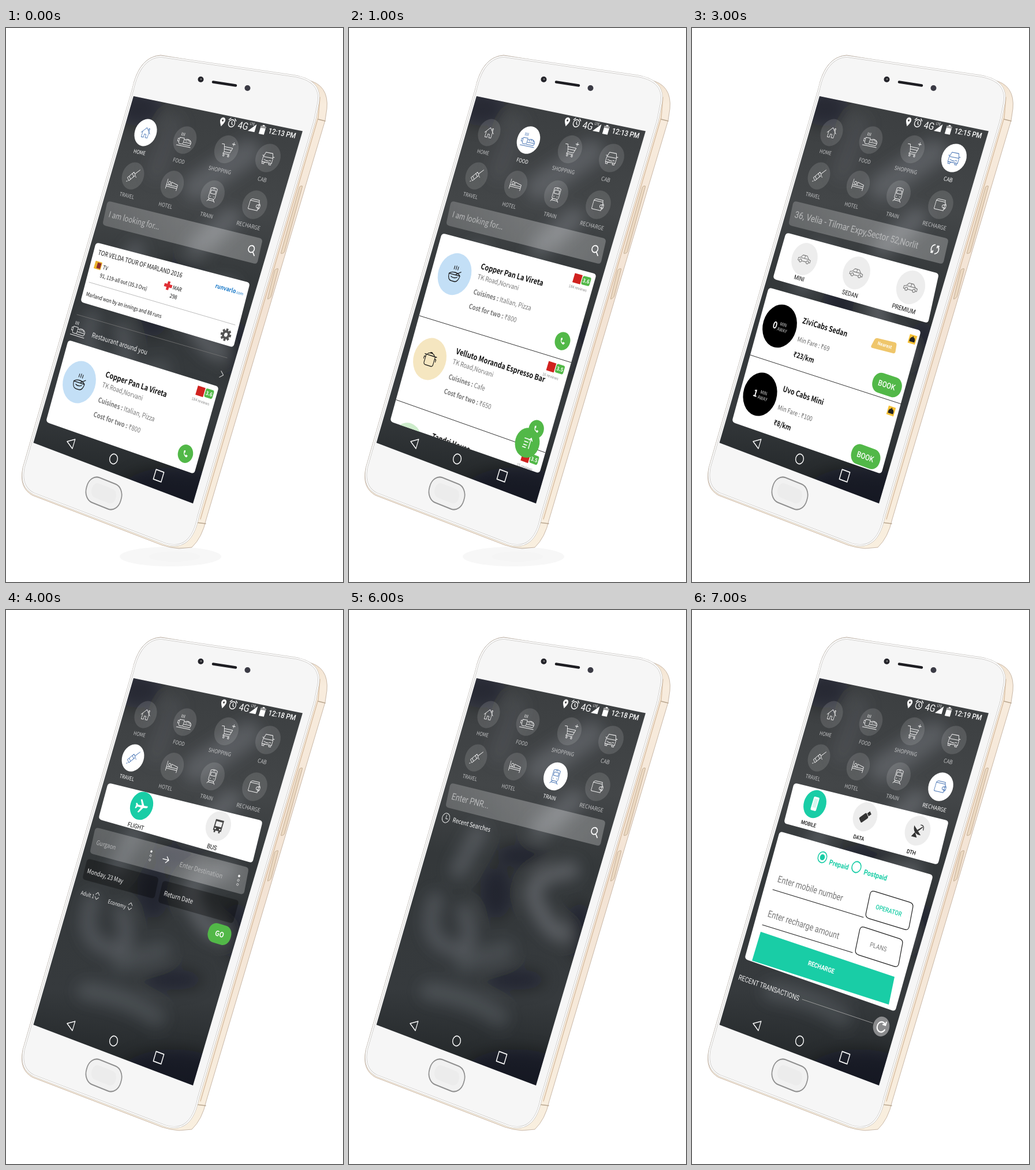
An HTML page for the animation above (8000 ms loop, 584 by 959 pixels).

```html
<!DOCTYPE html>
<html lang="en">
<head>
<meta charset="utf-8">
<title>Phone assistant tour</title>
<style>
html, body { margin: 0; width: 100%; height: 100%; overflow: hidden; background: #fff; }
svg { display: block; width: 584px; height: 959px; }
text { font-family: "Noto Sans CJK SC", "Noto Sans CJK JP", "Noto Sans CJK", "Noto Sans", sans-serif; white-space: pre; }
.r { font-family: Roboto, sans-serif; }
.m { text-anchor: middle; }
.b { font-weight: 700; }
.md { font-weight: 500; }
.line { fill: none; stroke-linecap: round; stroke-linejoin: round; }
.screen { visibility: hidden; animation: show 8s step-end infinite; }
@keyframes show {
  0% { visibility: visible; }
  12.5%, 100% { visibility: hidden; }
}
</style>
</head>
<body>
<svg id="stage" viewBox="0 0 584 959" xmlns="http://www.w3.org/2000/svg"></svg>
<script>
const GREEN = '#52b848', TEAL = '#19cda6', BLUE = '#4a76b5', DARK = '#151515', GREY = '#777';

// Linear part of the tilted screen plane near a stage point.
function plane(x, y) {
  const n = (x - 348 + .295 * (y - 203)) / 285;
  const m = y - 75 * n - 203;
  const slope = .207 + .000315 * m;
  const kx = (.85 + .13 * n) * (1 - .0001 * m), ky = 1.03 + .06 * n;
  return [kx, kx * slope, -.295 * ky, ky].map(k => k.toFixed(4)).join(' ');
}
const at = (x, y, inner) => `<g transform="matrix(${plane(x, y)} ${x} ${y})">${inner}</g>`;

function txt(x, y, s, size, fill, cls = '') {
  const half = / m\b|^m\b/.test(cls) ? 0 : s.replace(/<.*?>/g, '').length * size * .22;
  return `<text class="${cls}" transform="matrix(${plane(x + half, y + half * .27)} ${x} ${y})"
    y="${size * .36}" font-size="${size}" fill="${fill}">${s}</text>`;
}

const disc = (x, y, r, fill, inner = '') => at(x, y, `<circle r="${r}" fill="${fill}"/>${inner}`);
const stroke = (d, color = '#fff', w = 1.1) => `<path class="line" d="${d}" stroke="${color}" stroke-width="${w}"/>`;
const seg = (x1, y1, x2, y2, color, w = 1) => stroke(`M${x1},${y1}L${x2},${y2}`, color, w);
const pill = (x, y, w, h, r, fill) =>
  at(x, y, `<rect x="${-w / 2}" y="${-h / 2}" width="${w}" height="${h}" rx="${r}" fill="${fill}"/>`);

// Polygon with rounded corners, given as a flat list of corners.
function panel(c, r, fill, attrs = '') {
  const p = [], n = c.length / 2;
  for (let i = 0; i < n; i++) p.push([c[2 * i], c[2 * i + 1]]);
  const toward = (a, b) => {
    const k = r / Math.hypot(b[0] - a[0], b[1] - a[1]);
    return [a[0] + (b[0] - a[0]) * k, a[1] + (b[1] - a[1]) * k];
  };
  const d = p.map((a, i) =>
    `${i ? 'L' : 'M'}${toward(a, p[(i + n - 1) % n])}Q${a} ${toward(a, p[(i + 1) % n])}`).join('') + 'Z';
  return `<path d="${d}" fill="${fill}" ${attrs}/>`;
}

const MEAL = 'M-12,-3H-2V4Q-2,8 -5,8H-9Q-12,8 -12,4ZM-12,-1h-3v5h3M-10,-7v-5M-7,-7v-5M-4,-7v-5' +
  'M-2,8H13Q16,5 14,1Q10,-3 4,-2L-2,0M2,-1l2,3M6,-2l2,3M10,-1l2,3M-1,4H14M-15,11H16';
const CAR = 'M-13,4V0L-9,-1 -5,-6H4L9,-1 13,0V4H10M-13,4H-10M-5,4H5M-7,-1H8M0,-6V-1M-10,4a2.5,2.5 0 1,0 5,0a2.5,2.5 0 1,0 -5,0M5,4a2.5,2.5 0 1,0 5,0a2.5,2.5 0 1,0 -5,0';
const PHONE = '<path d="M-5,-5L-2,-6 -1,-2 -3,-1Q-2,2 1,3L2,1 6,2 5,5Q3,7 -1,4T-5,-5Z" fill="#fff" transform="scale(.85)"/>';
const BOWL = 'M-12,1H12Q11,12 3,12H-3Q-11,12 -12,1ZM-12,1Q-8,-3 0,-3T12,1M-6,5Q0,8 7,4M3,0L12,-6M-4,-8v-5M0,-8v-6M4,-8v-5';
const POT = 'M-10,-6H10V7Q10,11 6,11H-6Q-10,11 -10,7ZM-13,-6H13M-10,-2H-13V2M10,-2H13V2M-8,-6Q-7,-10 0,-10T8,-6M-2,-11H2';
const SEARCH = 'M-7,-2a5.5,5.5 0 1,0 11,0a5.5,5.5 0 1,0 -11,0M2.5,2L7,7';

const MENU = [
  ['HOME', 242, 181, 231.5, 215, 'M-10,1L0,-9 10,1M-7,-2V9H-2V3H2V9H7V-2M5,-4V-8H7V-2'],
  ['FOOD', 310, 194, 299.5, 230, MEAL],
  ['SHOPPING', 382, 210, 370.5, 246, 'M-12,-8H-7L-3,5H9L12,-4H-6M-5,0H10M-3,5L-5,8H9M-4,11a1.5,1.5 0 1,0 3,0a1.5,1.5 0 1,0 -3,0M6,11a1.5,1.5 0 1,0 3,0a1.5,1.5 0 1,0 -3,0M12,-14v6M9,-11h6'],
  ['CAB', 454, 225, 444, 262, 'M-10,8V0L-7,-9H7L10,0V8ZM-9,-1H9M-12,-3h3M12,-3h-3M-9,8v3h4V8M9,8v3H5V8M-7,4h3M7,4H4M-3,5H3'],
  ['TRAVEL', 220, 256, 209.5, 290, 'M-11,5L0,-7 5,-2 -6,10ZM-8,2L-3,7M-3,-4L2,1M3,-4L12,-13M-9,11l-2,1M6,0l2,1'],
  ['HOTEL', 288, 271, 276.5, 307, 'M-12,-8V9M-12,5H12V9M12,5V-1L-2,-4V2H-12M-12,2H12M-9,-2a2.5,2.5 0 1,0 5,0a2.5,2.5 0 1,0 -5,0'],
  ['TRAIN', 358, 288, 347.5, 324, 'M-7,-10Q0,-14 7,-10V5Q7,8 4,8H-4Q-7,8 -7,5ZM-5,-7H5V-1H-5ZM-4,4h1M3,4h1M-4,8L-8,13M4,8L8,13M-6,11H6M-2,-10H2'],
  ['RECHARGE', 431, 306, 420, 342, 'M-11,-6H8V9H-9Q-11,9 -11,7ZM-11,-6Q-10,-9 -7,-9H7V-6M11,-1H5Q2,1 5,4H11ZM8,-3H10V-1M8,6H10V4']
];

function header(active, clock, dx) {
  const menu = MENU.map(([label, x, y, lx, ly, icon], i) =>
    disc(x, y, 23, i === active ? '#fff' : 'rgba(255,255,255,.13)',
      `<g transform="scale(.93)">${stroke(icon, i === active ? BLUE : '#eee', 1.05)}</g>`) +
    txt(lx, ly, label, 9, i === active ? '#fff' : '#c4c5c6', 'm')).join('');
  return menu +
    at(375 + dx, 162, '<path d="M0,8Q-5,1 -5,-2A5,5 0 0 1 5,-2Q5,1 0,8Z" fill="#fff"/><circle cy="-2" r="1.7" fill="#444"/>') +
    at(391 + dx, 165, stroke('M-6,0a6,6 0 1,0 12,0a6,6 0 1,0 -12,0M0,-3V0L2,2M-7,-5l3,-3M7,-5l-3,-3', '#fff', 1.4)) +
    txt(411 + dx, 169, '4G', 16, '#fff', 'r m') +
    txt(427 + dx, 166, 'LTE', 6, '#fff', 'r m') +
    at(427 + dx, 173, '<path d="M-7,6H6V-7Z" fill="#fff"/>') +
    at(444.5, 176.5, '<path d="M-5,-6H-2V-8H2V-6H5V7H-5Z" fill="#fff"/><path d="M-5,-6H5V-3H-5Z" fill="#999"/>') +
    txt(478.5, 182, clock, 12.1, '#fff', 'r m md');
}

function searchBar(label, cls = 'r', size = 15.2, icon = SEARCH) {
  const [x, y] = icon === SEARCH ? [426, 385] : [421, 383];
  return panel([176, 299, 445, 365, 435, 409, 167, 341], 6, 'url(#bar)') +
    txt(178.5, 322, label, size, '#bbbcbd', cls) + at(x, y, stroke(icon, '#fff', 1.7));
}
const looking = () => searchBar('I am looking for...', '', 13.6);

// One listing; left and right halves drift apart slightly with the perspective.
function listing(lx, ly, rx, ry, o) {
  const t = (x, y, s, size, fill, cls) => txt(x + lx, y + ly, s, size, fill, cls);
  return disc(127 + lx, 613 + ly, 35, o.tint, stroke(o.icon, DARK, 1.3)) +
    t(173, 599, o.name, 12.7, '#111', 'b') +
    t(167, 617, o.place, 11.1, GREY) +
    t(160, 643, `<tspan class="b">${o.kind} : </tspan>${o.value}`, 11.2, GREY) +
    t(152, 668, `<tspan class="b">${o.cost} : </tspan>${o.price}`, 11.2, GREY) +
    pill(337 + rx, 629 + ry, 15, 15, 0, '#d0221f') +
    pill(352 + rx, 633 + ry, 16, 14, 3, GREEN) +
    txt(352 + rx, 633 + ry, o.score, 8.5, '#fff', 'm b') +
    txt(322 + rx, 641 + ry, o.reviews + ' reviews', 6.4, '#888') +
    disc(311 + rx, 737 + ry, 14.5, GREEN, PHONE);
}
const eatery = (tint, icon, name, value, price, score, reviews) =>
  ({ tint, icon, name, value, price, score, reviews, place: 'TK Road,Norvani', kind: 'Cuisines', cost: 'Cost for two' });
const ware = (tint, icon, name, value, price, score, reviews) =>
  ({ tint, icon, name, value, price, score, reviews, place: 'Free Delivery', kind: 'Colours', cost: 'Best price' });
const pizzeria = eatery('#c3dff6', BOWL, 'Copper Pan La Vireta', 'Italian, Pizza', '₹800', '3.6', '184');

function sheetOf(items) {
  const spots = [[55, -187, 58, -195], [12, -40, 12.5, -42.5], [-30, 107, -32, 114]];
  return looking() + panel([160, 355, 428, 426, 329, 771, 70, 681], 6, '#fff') +
    '<g clip-path="url(#sheet)">' + items.map((o, i) => listing(...spots[i], o)).join('') +
    seg(121, 498, 384, 579, '#333') + seg(79, 643, 339, 735, '#333') + '</g>';
}

function home() {
  const gear = [...Array(8)].map((_, i) => `<rect x="-2" y="-10" width="4" height="5" transform="rotate(${i * 45})"/>`).join('');
  return looking() +
    panel([156, 371, 423, 441, 394, 553, 129, 474], 6, '#fff') +
    txt(160, 388, 'TOR VELDA TOUR OF MARLAND 2016', 10.7, DARK) +
    pill(159.5, 411, 15, 13, 1, '#e9b22c') + pill(161, 411.5, 8, 9, 0, '#8d2b2b') +
    txt(168, 414, 'TV', 9.2, DARK) +
    txt(163, 428, '91, 119-all out (35.3 Ovs)', 9, DARK) +
    at(281, 446, '<path d="M-2.5,-7H2.5V-2.5H8V2.5H2.5V7H-2.5V2.5H-8V-2.5H-2.5Z" fill="#df3036"/>') +
    txt(289, 449, 'MAR', 9, DARK) + txt(284, 463, '298', 9, DARK) +
    txt(363, 446, 'runvarlo<tspan font-size="6.5" font-weight="400">.com</tspan>', 9.5, '#1878c8', 'b') +
    seg(144, 440, 397, 514, '#aaa', .8) +
    txt(139, 460, 'Marland won by an innings and 88 runs', 9, DARK) +
    at(381, 531, `<g fill="#555">${gear}</g><circle r="5.2" fill="none" stroke="#555" stroke-width="4"/>`) +
    seg(123, 496, 383, 571, '#777', .8) +
    at(126, 522, stroke(MEAL, '#eee', 1)) +
    txt(149, 531, 'Restaurant around you', 11.3, '#eee') +
    at(374, 600, stroke('M-3,-5L3,0 -3,5', '#ccc')) +
    panel([108, 540, 369, 621, 326, 772, 69, 682], 6, '#fff') +
    listing(0, 0, 0, 0, pizzeria);
}

const food = () => sheetOf([
  pizzeria,
  eatery('#f5e6c0', POT, 'Velluto Moranda Espresso Bar', 'Cafe', '₹650', '3.5', '16'),
  eatery('#cdeccb', BOWL, 'Tandri House', 'Indian', '₹500', '3.5', '15')
]) + disc(308, 718, 23.5, GREEN, stroke('M-7,-6H2M-6,-1H1M-6,4H0M-7,8H-1M5,8V-8M2,-5L5,-9 8,-5', '#fff', 1.5));

const SHIRT = 'M-5,-11L-13,-5 -9,1 -7,-1V12H7V-1L9,1 13,-5 5,-11Q0,-6 -5,-11Z';
const shopping = () => sheetOf([
  ware('#c3dff6', SHIRT, 'Cotton Casual Shirt', 'Blue, White', '₹799', '3.8', '120'),
  ware('#f5e6c0', POT, 'Steel Cooking Pot', 'Silver', '₹650', '3.5', '42'),
  ware('#cdeccb', BOWL, 'Serving Bowl', 'White', '₹300', '3.4', '18')
]);

function ride(dx, dy, ex, ey, wait, name, fare, rate) {
  return disc(152 + dx, 516 + dy, 36, '#000') +
    txt(144 + dx, 514 + dy, wait, 16, '#fff', 'm b') +
    txt(158.5 + dx, 513.5 + dy, 'MIN', 8, '#ddd', 'm') + txt(156 + dx, 523 + dy, 'AWAY', 8, '#ddd', 'm') +
    txt(192 + dx, 506 + dy, name, 12.7, DARK, 'b') +
    txt(183 + dx, 538 + dy, `Min Fare : ${fare}`, 10.8, '#666', 'md') +
    txt(176 + dx, 564 + dy, rate, 12, DARK, 'b') +
    at(382 + ex, 539 + ey, '<rect x="-7" y="-7" width="14" height="14" fill="#f5c034"/><path d="M-5,4V0L-3,-3H-1V-5H1V-3H3L5,0V4Z" fill="#222"/>') +
    pill(338 + ex, 618 + ey, 57, 32, 15, GREEN) + txt(337.5 + ex, 618 + ey, 'BOOK', 12.7, '#fff', 'r m md');
}
const cabType = (x, y, lx, ly, label) =>
  disc(x, y, 27, '#ededed', stroke(CAR, '#777', 1.1)) + txt(lx, ly, label, 10.3, '#111', 'r m');

const cab = () =>
  searchBar('36, Velia - Tilmar Expy,Sector 52,Norlit', 'r', 15.2,
    'M-2,-7Q-8,-5 -7,1Q-6,5 -3,6M-6,6H-3V3M2,7Q8,5 7,-1Q6,-5 3,-6M6,-6H3V-3') +
  panel([163, 354, 428, 425, 409, 511, 140, 434], 6, '#fff') +
  cabType(195, 400, 186, 433, 'MINI') + cabType(285, 424, 274, 460, 'SEDAN') + cabType(379, 449, 367, 486, 'PREMIUM') +
  panel([133, 449, 397, 524, 328, 772, 69, 682], 6, '#fff') +
  ride(0, 0, 0, 0, '0', 'ZiviCabs Sedan', '₹69', '₹23/km') +
  panel([318, 536, 355, 545, 352, 564, 317, 555, 309, 553], 4, '#efc66b') +
  txt(334, 549, 'Nearest', 7.5, '#fff', 'm b') +
  seg(101, 566, 363, 651, '#333') +
  ride(-34, 118, -37, 124, '1', 'Uvo Cabs Mini', '₹100', '₹8/km');

const dots = (x, y) => [0, 1, 2].map(i =>
  at(x - i * 1.4, y + i * 7.3, `<circle r="1.7" fill="${i ? 'none' : '#fff'}" stroke="#ddd" stroke-width=".8"/>`)).join('');
const spinner = (x, y) => at(x, y, stroke('M-4,-2L0,-6 4,-2M-4,2L0,6 4,2', '#ddd', 1));

const dates = (dx, dy, from, to, first, second) => `<g transform="translate(${dx} ${dy})">` +
  panel([141, 430, 265, 463, 257, 500, 132, 466], 6, 'rgba(0,0,0,.32)') +
  panel([272, 468, 404, 503, 393, 543, 263, 506], 6, 'rgba(0,0,0,.32)') +
  txt(141, 451, from, 10.7, '#eee') + txt(274, 490, to, 10.7, '#eee') +
  txt(130, 489, first, 9, '#eee') + spinner(158, 495) +
  txt(177, 504, second, 9, '#eee') + spinner(215, 513) +
  pill(370, 561, 44, 31, 14, GREEN) + txt(370, 561, 'GO', 11.5, '#fff', 'm b') + '</g>';

const BUS = '<path d="M-8,-10H8V8H6V11H3V8H-3V11H-6V8H-8Z" fill="#444"/><path d="M-6,-7H6V1H-6ZM-6,4h3v2h-3ZM3,4h3v2H3Z" fill="#eee"/>';
const PLANE = '<path transform="rotate(10)" d="M12,-4Q14,-2 11,0L5,2 0,12 -3,12 0,3 -7,4 -9,8H-11L-11,3 -13,0 -11,-1 -7,1 0,-1 -7,-9 -4,-10 5,-2Z" fill="#fff"/>';

const travel = () =>
  panel([177, 299, 445, 365, 427, 438, 160, 362], 6, '#fff') +
  disc(235, 339, 23.5, TEAL, PLANE) + txt(225, 374, 'FLIGHT', 10.3, '#111', 'r m') +
  disc(368, 374, 24, '#ededed', BUS) + txt(357, 410, 'BUS', 10.3, '#111', 'r m') +
  panel([155, 376, 421, 446, 412, 493, 145, 421], 6, 'url(#bar)') +
  txt(157, 402, 'Gurgaon', 10.7, '#b8b9ba') + dots(252, 418) +
  at(277, 432, stroke('M-6,0H6M1,-5L6,0 1,5', '#fff', 1.4)) +
  txt(301, 440, 'Enter Destination', 10.7, '#b8b9ba') + dots(404, 460.5) +
  dates(0, 0, 'Monday, 23 May', 'Return Date', 'Adult 1', 'Economy');

const hotel = () => searchBar('Enter City...') +
  dates(20, -81, 'Monday, 23 May', 'Tuesday, 24 May', 'Adult 1', 'Room 1');

const train = () => searchBar('Enter PNR...') +
  at(168, 360, stroke('M-8,0a8,8 0 1,0 16,0a8,8 0 1,0 -16,0M0,-5V1H4', '#eee', 1.1)) +
  txt(180, 363, 'Recent Searches', 10.7, '#fff');

const recharge = () =>
  panel([177, 299, 445, 365, 426, 441, 159, 369], 6, '#fff') +
  disc(213, 336, 23.5, TEAL, '<rect x="-6" y="-12" width="12" height="23" rx="2" fill="#fff"/><path d="M-4,-9H4V6H-4Z" fill="#d5f5ee"/>') +
  disc(300, 358, 24, '#ededed', '<g fill="#333" transform="rotate(-45)"><rect x="-11" y="-5" width="16" height="10" rx="2"/><path d="M6,-3h6V3H6Z"/></g>') +
  disc(391, 382, 24, '#ededed', '<path d="M-9,-7Q-8,7 8,6ZM-9,11L-4,3 2,11ZM-1,-1L7,-8 8,-7 1,1Z" fill="#333"/>' + stroke('M3,-10Q10,-11 10,-3', '#333', 1.3)) +
  txt(202, 370, 'MOBILE', 9.1, '#111', 'r m md') + txt(289, 394, 'DATA', 9.1, '#111', 'r m md') + txt(380, 419, 'DTH', 9.1, '#111', 'r m md') +
  panel([152, 383, 418, 459, 352, 695, 91, 604], 6, '#fff') +
  [[226, 428], [285, 445]].map(([x, y], i) =>
    at(x, y, `<circle r="9" fill="none" stroke="${TEAL}" stroke-width="1.8"/>${i ? '' : `<circle r="5" fill="${TEAL}"/>`}`)).join('') +
  txt(238, 436, 'Prepaid', 11.8, TEAL, 'r b') + txt(298, 453, 'Postpaid', 11.8, TEAL, 'r b') +
  txt(149, 465, 'Enter mobile number', 15.2, GREY, 'r') + seg(140, 484, 297, 532, '#222', 1.1) +
  txt(132, 525, 'Enter recharge amount', 15.2, GREY, 'r') + seg(122, 545, 278, 593, '#222', 1.1) +
  panel([310, 485, 384, 508, 375, 555, 300, 532], 7, '#fff', 'stroke="#222" stroke-width="1.2"') +
  txt(341, 520, 'OPERATOR', 10.3, TEAL, 'r m md') +
  panel([292, 547, 366, 571, 357, 619, 282, 595], 7, '#fff', 'stroke="#222" stroke-width="1.2"') +
  txt(323, 583, 'PLANS', 10.6, GREY, 'r m') +
  panel([119, 557, 351, 635, 341, 683, 104, 607], .1, TEAL) +
  txt(224, 618, 'RECHARGE', 10.8, '#fff', 'r m b') +
  txt(81, 635, 'RECENT TRANSACTIONS', 12.1, '#eee', 'r') + seg(191, 674, 313, 715, '#999') +
  disc(328, 721, 15.5, '#8a8b8d', stroke('M6,-5A8,8 0 1 0 8,3M7,-9V-4H2', '#fff', 2.2));

// Blurred strokes give the smoky wallpaper its curls.
function backdrop() {
  const smoke = (d, w, o) => `<path class="line" d="${d}" stroke="#c9ced4" stroke-width="${w}" opacity="${o}"/>`;
  const shade = (x, y, rx, ry) => `<ellipse cx="${x}" cy="${y}" rx="${rx}" ry="${ry}" fill="#0d1113" opacity=".34"/>`;
  return `<g clip-path="url(#glass)"><rect width="584" height="959" fill="url(#night)"/><g filter="url(#soft)">` +
    smoke('M420,215L330,275', 45, .2) + smoke('M290,165L260,250', 35, .08) + smoke('M390,330L330,380', 35, .22) +
    smoke('M225,385L190,450', 30, .2) + smoke('M385,450Q300,460 325,510T370,560', 30, .26) +
    smoke('M150,500Q125,570 175,585T200,520', 24, .2) + smoke('M270,590L200,610', 34, .13) +
    smoke('M140,660Q210,670 260,705', 34, .15) +
    shade(230, 140, 40, 30) + shade(300, 425, 45, 20) + shade(255, 490, 28, 45) +
    shade(400, 555, 22, 50) + shade(290, 640, 50, 18) + shade(290, 800, 90, 40) + '</g></g>';
}

function phone() {
  const face = 'M220,106Q232,51 268,49L500,83Q548,91 541,130L535,160 333,846Q321,907 276,893L48,806Q24,794 31,760Z';
  return `<path d="M219,106Q230,50 268,47L522,90Q560,98 556,140L553,160 347,850Q340,882 322,899L300,901Q285,900 270,895L46,809Q22,796 29,762Z"
      fill="url(#gold)" stroke="#c9b8a8" stroke-width="1"/>` +
    stroke('M544,120L541,155 337,850', '#dcc3a8', 1.6) +
    seg(541, 158, 553, 161, '#b9a68f', 1.5) + seg(330, 856, 346, 858, '#b9a68f', 1.5) +
    panel([509, 274, 514, 273, 482, 389, 476, 391], 2, '#ecd9c2', 'stroke="#bfa98f" stroke-width=".9"') +
    panel([466, 418, 472, 416, 459, 466, 453, 470], 2, '#ecd9c2', 'stroke="#bfa98f" stroke-width=".9"') +
    `<path d="${face}" fill="#f6f6f6" stroke="#c3c0bd" stroke-width="3.4"/><path d="${face}" fill="none" stroke="#fff" stroke-width="2"/>` +
    seg(359, 93.5, 398, 99.5, '#1d1d22', 4.5) +
    '<circle cx="337.5" cy="89" r="5" fill="#24242a"/><circle cx="338" cy="88.5" r="1.5" fill="#777"/><circle cx="418.5" cy="104" r="5" fill="#3b3b45"/>' +
    at(169.5, 805.5, '<rect x="-37" y="-21" width="74" height="42" rx="19.5" fill="#f1f1f1" stroke="#8f8f8f" stroke-width="2"/><rect x="-26" y="-12" width="52" height="24" rx="11" fill="#ececec"/>');
}

const navKeys = at(112, 718, stroke('M7,-8V8L-8,0Z', '#fff', 1.5)) +
  at(186.5, 746, stroke('M-8,0a8,8 0 1,0 16,0a8,8 0 1,0 -16,0', '#fff', 1.6)) +
  at(264.5, 775, stroke('M-8,-8H8V8H-8Z', '#fff', 1.6));

const shadow = '<g style="mix-blend-mode:multiply"><ellipse cx="285" cy="915" rx="88" ry="17" fill="#f7f7f7"/>' +
  '<ellipse cx="292" cy="915" rx="44" ry="9" fill="#f5f5f5"/></g>';

const screens = [
  [home, '12:13 PM', 0], [food, '12:13 PM', 2], [shopping, '12:14 PM', 2], [cab, '12:15 PM', 0],
  [travel, '12:18 PM', 2], [hotel, '12:18 PM', 3], [train, '12:18 PM', 0], [recharge, '12:19 PM', 2]
].map(([body, clock, dx], i) => {
  const nudge = i === 1 || i === 2 ? 1 : 0;
  return `<g class="screen" style="animation-delay:${i - 8}s">${i < 3 ? shadow : ''}
    <g transform="translate(${nudge})">${header(i, clock, dx)}${body()}${navKeys}</g></g>`;
}).join('');

document.getElementById('stage').innerHTML = `
  <defs>
    <clipPath id="glass"><path d="M221,118L514,178.5 324,823 47.5,718Z"/></clipPath>
    <clipPath id="sheet"><path d="M160,355L428,426 329,771 70,681Z"/></clipPath>
    <filter id="soft" filterUnits="userSpaceOnUse" x="0" y="60" width="584" height="860"><feGaussianBlur stdDeviation="13"/></filter>
    <linearGradient id="night" x1=".5" y1="0" x2=".45" y2="1">
      <stop offset=".12" stop-color="#3b3e40"/><stop offset=".32" stop-color="#434648"/>
      <stop offset=".45" stop-color="#34383a"/><stop offset=".7" stop-color="#363a3d"/><stop offset=".86" stop-color="#1f2325"/>
    </linearGradient>
    <linearGradient id="bar"><stop offset="0" stop-color="#fff" stop-opacity=".2"/><stop offset=".7" stop-color="#fff" stop-opacity=".3"/><stop offset="1" stop-color="#fff" stop-opacity=".25"/></linearGradient>
    <linearGradient id="gold" x1="0" y1="0" x2="0" y2="1">
      <stop offset="0" stop-color="#ecd9c3"/><stop offset=".1" stop-color="#f8ecdd"/><stop offset=".5" stop-color="#f3e3d4"/><stop offset="1" stop-color="#f9efdf"/>
    </linearGradient>
  </defs>
  <rect width="584" height="959" fill="#fff"/>${phone()}${backdrop()}${screens}`;
</script>
</body>
</html>
```
